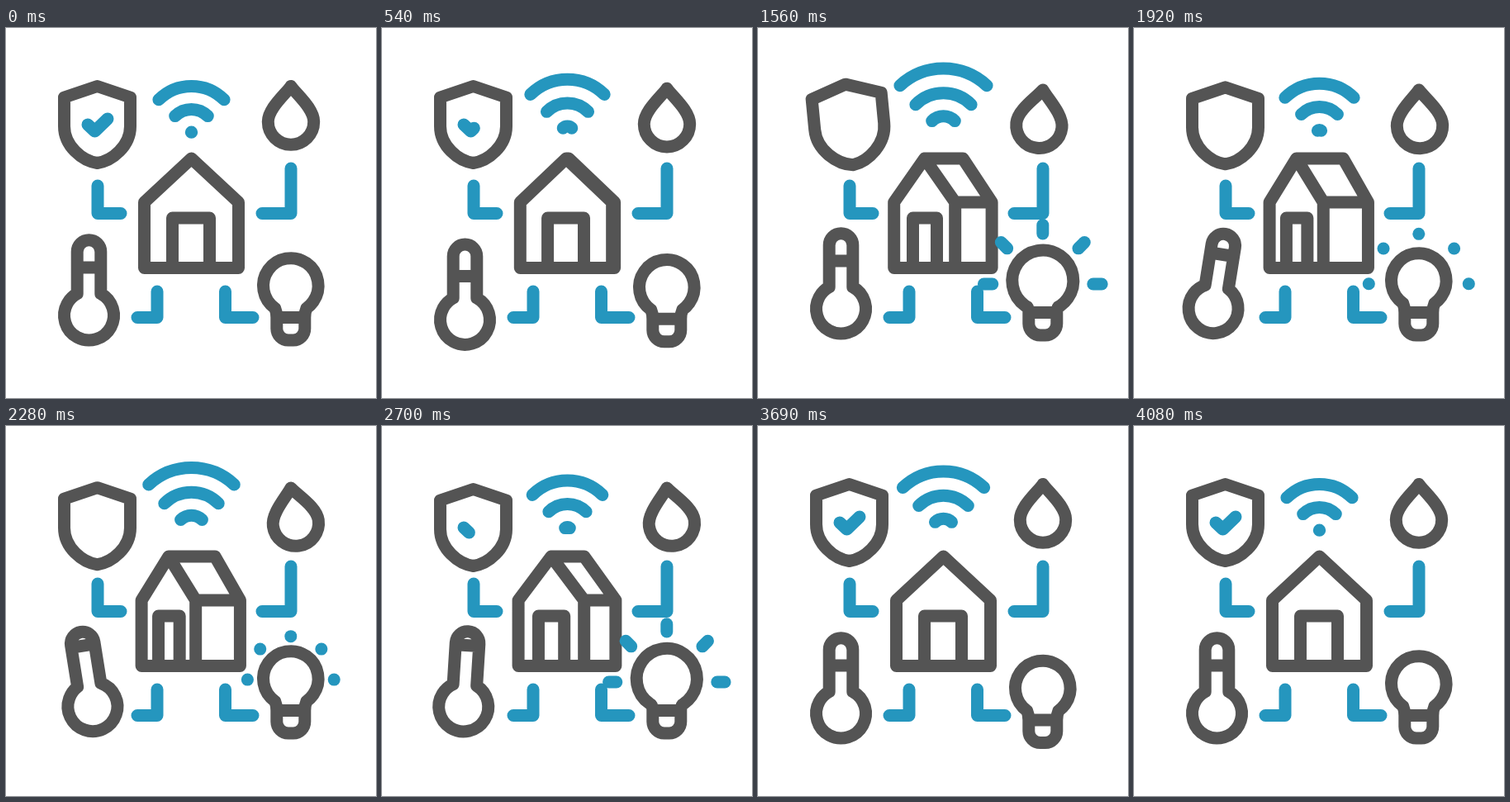
Write an HTML page with a canvas that moves like this. It is 448 px wide and 448 px high and loops after 4500 ms.

```html
<!DOCTYPE html>
<html lang="en">
<head>
<meta charset="utf-8">
<title>Smart home</title>
<style>
  html, body { margin: 0; width: 100%; height: 100%; overflow: hidden; background: #fff; }
  canvas { display: block; width: 100vw; height: 100vh; }
</style>
</head>
<body>
<canvas id="stage" width="448" height="448"></canvas>
<script>
const ctx = document.getElementById('stage').getContext('2d');
const DARK = '#545454', BLUE = '#2596be';
const LOOP = 4500, STEP = 30, START = 330, END = 4080;
const { PI, sin, cos, max, min } = Math;
const UP = -PI / 2;

const lerp = (a, b, u) => a + (b - a) * u;
const span = (t, a, b) => min(1, max(0, (t - a) / (b - a)));

// Eased motion: one way, there and back, or there and back after a hold.
const ease = (t, a, b) => (1 - cos(PI * span(t, a, b))) / 2;
const hold = (t, a, b, c, d) => ease(t, a, b) - ease(t, c, d);
const hump = (t, a, peak, b) => hold(t, a, peak, peak, b);
const swing = (t, a, b, cycles) => sin(2 * PI * cycles * span(t, a, b));

function stroke(color, build) {
  ctx.strokeStyle = color;
  ctx.beginPath();
  build();
  ctx.stroke();
}

function polyline(points, closed) {
  points.forEach(([x, y], i) => i ? ctx.lineTo(x, y) : ctx.moveTo(x, y));
  if (closed) ctx.closePath();
}

function placed(x, y, degrees, draw) {
  ctx.save();
  ctx.translate(x, y);
  ctx.rotate(degrees * PI / 180);
  draw();
  ctx.restore();
}

function brackets() {
  const elbow = (x, y, endX, endY) => polyline([[x, y], [x, endY], [endX, endY]]);
  stroke(BLUE, () => {
    elbow(111, 191, 139, 224.5);
    elbow(345, 170, 310, 224.5);
    elbow(183, 319, 159, 350.5);
    elbow(265.5, 319, 299, 350.5);
  });
}

function house(t) {
  const turn = hump(t, 270, 2100, 3690);
  const left = lerp(167.5, 164, turn), right = lerp(281.5, 283.5, turn);
  const apex = lerp(224.5, 196, turn), ridge = lerp(224.5, 254, turn);
  const corner = lerp(281.5, 228, turn);
  const doorL = lerp(201.5, 184, turn), doorR = lerp(246.5, 209, turn);
  const top = 158, eave = 211, base = 290.5;
  stroke(DARK, () => {
    polyline([[left, base], [left, eave], [apex, top], [corner, eave], [corner, base]], true);
    polyline([[doorL, base], [doorL, 230], [doorR, 230], [doorR, base]]);
    polyline([[apex, top], [ridge, top], [right, eave], [right, base], [corner, base]]);
    polyline([[corner, eave], [right, eave]]);
  });
}

function wifi(t) {
  const moving = t >= START && t < END;
  const u = moving ? ((t - START) % 750 + STEP) / 750 : 0;
  const grow = 27 * (u + ease(u, 0, 1)) / 2;
  const wave = r => {
    const half = (45 - max(0, r - 56) * 0.1) * PI / 180;
    stroke(BLUE, () => ctx.arc(224.5, 126.4, max(r, 0.3), UP - half, UP + half));
  };
  [grow, 28 + grow, 56 + grow * 1.09].forEach(wave);
}

function shield(t) {
  const sway = hump(t, 720, 1320, 1710);
  const dy = 6 * hold(t, 1560, 2700, 3000, 3690);
  const check = 1 - hold(t, 330, 750, 2550, 3000);
  const s = 1 + 0.17 * sway, w = 40 * s;
  placed(110.5, 117 + dy, -17 * sway, () => {
    stroke(DARK, () => {
      ctx.moveTo(0, -46.5 * s);
      ctx.lineTo(w, -33 * s);
      ctx.lineTo(w, 2 * s);
      ctx.bezierCurveTo(w, 26 * s, 18 * s, 44 * s, 0, 46.5 * s);
      ctx.bezierCurveTo(-18 * s, 44 * s, -w, 26 * s, -w, 2 * s);
      ctx.lineTo(-w, -33 * s);
      ctx.closePath();
    });
    if (check < 0.01) return;
    const a = span(check, 0, 1 / 3), b = span(check, 1 / 3, 1);
    stroke(BLUE, () => polyline([
      [-11.5, 0],
      [lerp(-11.5, -3, a), lerp(0, 8, a)],
      [lerp(-11.5, -3, a) + 15.5 * b, lerp(0, 8, a) - 15 * b]
    ]));
  });
}

function drop(t) {
  const dy = 4.5 * (hold(t, 330, 900, 3120, 3690) + hump(t, 330, 900, 1560));
  const r = 27.7;
  placed(345, 70.5 + dy, 9 * swing(t, 600, 3120, 1), () => stroke(DARK, () => {
    ctx.moveTo(0, 0);
    ctx.bezierCurveTo(-7, 10, -r, 27, -r, 43);
    ctx.arc(0, 43, r, PI, 0, true);
    ctx.bezierCurveTo(r, 27, 7, 10, 0, 0);
    ctx.closePath();
  }));
}

function thermometer(t) {
  const sink = hump(t, 330, 900, 1560);
  const dy = 18 * sink - 8 * hold(t, 900, 1560, 3120, 3510) + 11 * hump(t, 3120, 3510, 3690);
  const level = -58 + 17 * sink - 16.5 * hold(t, 1560, 2280, 3120, 3690);
  const half = 14.3, r = 30, pivot = 28;
  const gap = Math.asin(half / r);
  placed(100.5, 348 + dy - pivot, 10.5 * swing(t, 1560, 3180, 1.5), () => {
    ctx.translate(0, pivot);
    stroke(DARK, () => {
      ctx.arc(0, 0, r, UP + gap, UP - gap + 2 * PI);
      ctx.lineTo(-half, -77);
      ctx.arc(0, -77, half, PI, 0);
      ctx.closePath();
      polyline([[-half, level], [half, level]]);
    });
  });
}

function bulb(t) {
  const dy = 6 * (hump(t, 330, 900, 1380) - hold(t, 930, 1380, 2910, 3570) + hump(t, 3120, 3600, 4080));
  const pulse = cos(2 * PI * (t - 1600) / 1200);
  const reach = 33 + (28.5 + 10 * pulse) * hold(t, 1050, 1380, 3120, 3450);
  const r = 33.3 + 0.36 * max(0, reach - 61);
  const neck = 55 * PI / 180, w = 17;

  // Rays stay dots until they pass their resting distance.
  if (reach > 33.5) {
    const tail = min(reach, 61), cy = min(310, 307 + (reach - 52) / 3);
    for (let i = 0; i < 5; i++) {
      const a = PI + i * PI / 4;
      const at = d => [344.8 + d * cos(a), cy + d * sin(a)];
      stroke(BLUE, () => polyline([at(tail), at(reach + 0.1)]));
    }
  }

  placed(344.8, 312 + dy, 0, () => stroke(DARK, () => {
    ctx.moveTo(-w, 38.5);
    ctx.quadraticCurveTo(-w, 32, -r * cos(neck), r * sin(neck));
    ctx.arc(0, 0, r, PI - neck, neck);
    ctx.quadraticCurveTo(w, 32, w, 38.5);
    ctx.closePath();
    ctx.arcTo(-w, 66, 0, 66, 14);
    ctx.arcTo(w, 66, w, 38.5, 14);
    ctx.lineTo(w, 38.5);
  }));
}

function render(now) {
  const t = Math.floor(((now + 1) % LOOP) / STEP) * STEP;
  ctx.fillStyle = '#fff';
  ctx.fillRect(0, 0, 448, 448);
  ctx.lineWidth = 15;
  ctx.lineCap = ctx.lineJoin = 'round';
  [brackets, wifi, house, shield, drop, thermometer, bulb].forEach(draw => draw(t));
}

function tick() {
  render(performance.now());
  requestAnimationFrame(tick);
}
tick();
</script>
</body>
</html>
```
